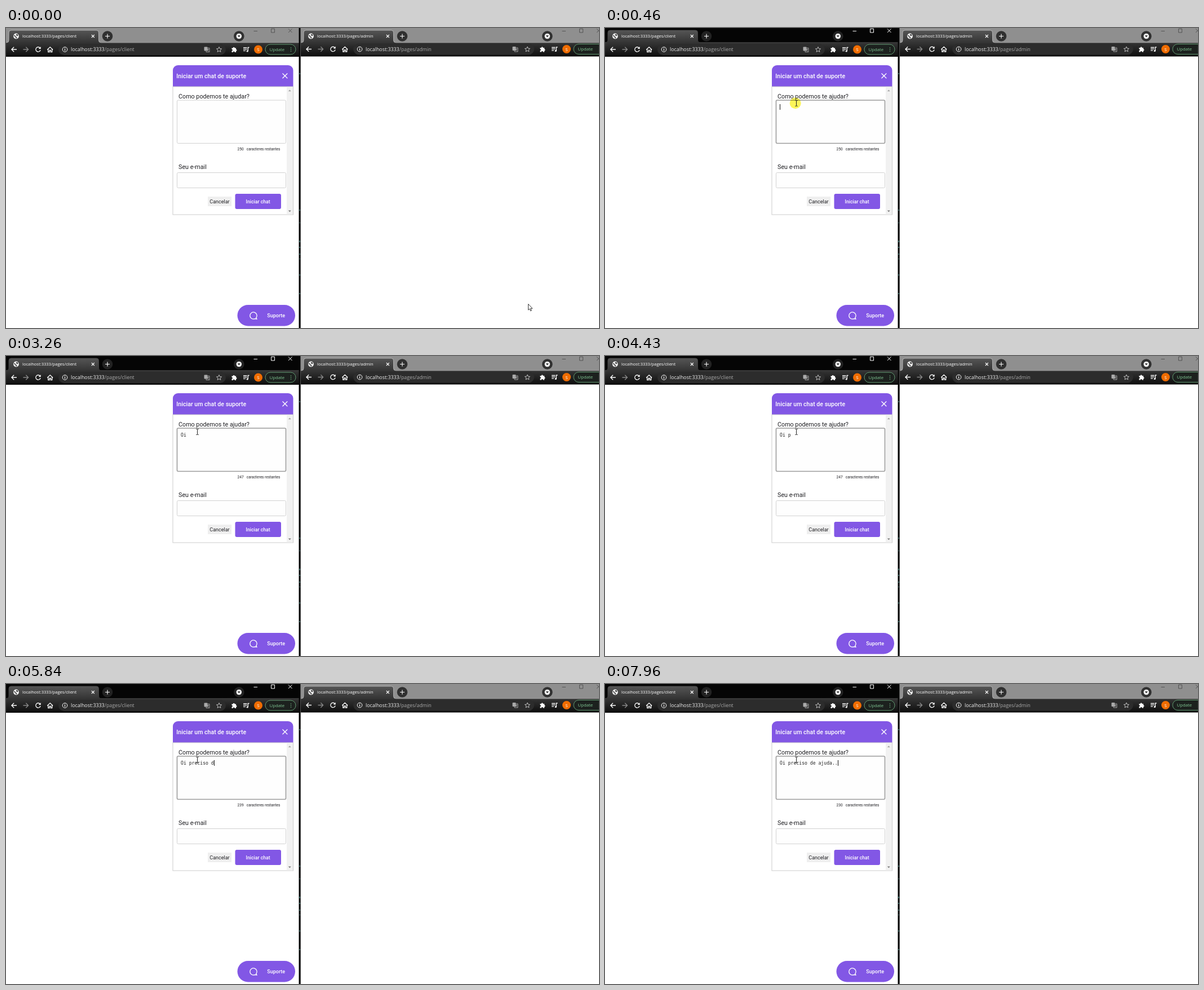
Recreate the animation shown at these times as an HTML page. Size 1052 by 532 pixels, loop 8 s.

```html
<!DOCTYPE html>
<html lang="pt">
<head>
<meta charset="utf-8">
<title>Chat de suporte</title>
<style>
  html, body { margin: 0; width: 100%; height: 100%; overflow: hidden; background: #fff; }
  svg { display: block; width: 1052px; height: 532px; }
  text { white-space: pre; }
  .win { --bar: #8f8f8f; --ctl: #555; --edge: #c4c4c4; --disc: #303030; }
  .win.active { --bar: #050505; --ctl: #fff; --edge: #4a4a4a; --disc: #222; }
  .ui { font-family: "Open Sans", "Noto Sans", sans-serif; }
  .page { font-family: Roboto, Arial, sans-serif; fill: #202024; }
  .mono { font-family: "DejaVu Sans Mono", "Noto Sans Mono", monospace; fill: #222; }
  .line { fill: none; stroke: #fff; stroke-width: 1.3; }
  .field { fill: #fefefe; stroke: #d2d2d2; }
  .focus { stroke: #9b9b9b; stroke-width: 1.6; }
</style>
</head>
<body>
<svg id="stage" viewBox="0 0 1052 532" xmlns="http://www.w3.org/2000/svg">
  <defs>
    <linearGradient id="tabFill" x1="0" y1="0" x2="0" y2="1">
      <stop offset="0" stop-color="#555"/><stop offset="1" stop-color="#343434"/>
    </linearGradient>
    <linearGradient id="toolFill" x1="0" y1="0" x2="0" y2="1">
      <stop offset="0" stop-color="#353535"/><stop offset="1" stop-color="#0d0d0d"/>
    </linearGradient>
  </defs>
  <rect width="1052" height="532" fill="#fff"/>
  <g id="windows"></g>
  <rect x="519.5" width="3.2" height="532" fill="#080808"/>
  <path d="M521 80v2M521 322v2M521 345v1M521 377v3M521 388v2M521 400v2M521 409v1M521 437v2M521 470v2" stroke="#3d7f78" stroke-width="1.4"/>

  <g class="page">
    <path d="M296 104V75a9 9 0 0 1 9-9h195.500a9 9 0 0 1 9 9v29z" fill="#8257e5"/>
    <text x="302.300" y="89" font-size="10.6" font-weight="500" fill="#fff">Iniciar um chat de suporte</text>
    <path d="M490.500 80.500l8.800 8.800M499.300 80.500l-8.800 8.800" class="line"/>
    <rect x="296" y="104" width="213.500" height="227" fill="#fff" stroke="#ccc"/>
    <rect x="498" y="104.500" width="11" height="226" fill="#f1f1f1"/>
    <path d="M500.800 112.300h5l-2.500-2.800z" fill="#a3a3a3"/>
    <path d="M500.800 323.400h5l-2.500 2.800z" fill="#777"/>
    <text x="306" y="125" font-size="10.75">Como podemos te ajudar?</text>
    <rect id="area" class="field" x="303.500" y="128" width="193" height="76.500" rx="2"/>
    <text id="left" x="410.500" y="217.300" font-size="6.6"></text>
    <text x="426.800" y="217.300" font-size="6.55">caracteres restantes</text>
    <text x="306" y="250" font-size="10.75">Seu e-mail</text>
    <rect class="field" x="303.500" y="256.500" width="193" height="27" rx="2"/>
    <rect x="358" y="299" width="42" height="17" fill="#efefef"/>
    <text x="361.300" y="311" font-size="9">Cancelar</text>
    <rect x="406.500" y="294" width="81.500" height="27" rx="3" fill="#8257e5"/>
    <text x="425.500" y="311" font-size="8.7" font-weight="500" fill="#fff">Iniciar chat</text>
    <rect x="410.500" y="491" width="102.500" height="37.500" rx="18.750" fill="#8257e5"/>
    <path d="M443.400 514.200a6.100 6.100 0 1 0-2.200 1.500l4 .5z" class="line" stroke-linejoin="round"/>
    <text x="463.300" y="513.400" font-size="9" font-weight="500" fill="#fff">Suporte</text>
  </g>
  <text id="typed" class="mono" x="310" y="143" font-size="8.14"></text>
  <rect id="caret" y="135" width="1" height="10" fill="#111"/>
  <circle id="halo" cx="337.700" cy="133.300" r="10" fill="#fdf65a" style="mix-blend-mode:multiply"/>
  <path id="arrow" d="M0 0v10.600l2.400-2.200 1.700 3.900 1.700-.8-1.700-3.700h3.300z" fill="#fff" stroke="#222" stroke-width=".9"/>
  <path id="beam" d="M-2.200-5h1.600l.6.500.6-.5h1.600M0-4.500v9M-2.200 5h1.600l.6-.5.6.5h1.600" fill="none" stroke="#222"/>
</svg>
<script>
const $ = id => document.getElementById(id);
const LOOP = 8000;
const MESSAGE = "Oi preciso de ajuda..";

// x: left edge, gap: extra shift of right-hand controls, width: visible width
function browser({ id, x, gap, width, page, dy }) {
  const r = n => n + gap;
  const address = `
    <path class="line" d="M19 38h-9m4.200-4.300l-4.300 4.300 4.300 4.300"/>
    <path class="line" style="stroke:#888" d="M30.500 38h9m-4.200-4.300l4.300 4.300-4.300 4.300"/>
    <path class="line" d="M60.300 35.300a4.200 4.200 0 1 0 .8 3.700"/><path d="M61.700 33v4h-4z" fill="#fff"/>
    <path class="line" d="M73.200 38.500l5-4.700 5 4.700M74.800 37.500v5h2.300v-3h2.300v3h2.300v-5"/>
    <rect x="93" y="28" width="${r(297)}" height="20" rx="10" fill="#2c2c2c"/>
    <circle cx="104.500" cy="38" r="4.300" class="line" style="stroke-width:1"/>
    <path d="M104.500 37.300v3M104.500 35.300v1" class="line"/>
    <text x="115" y="41.200" font-size="8.85" fill="#f1f1f1">localhost:3333<tspan fill="#a9a9a9">/pages/${page}</tspan></text>
    <g transform="translate(${gap} 0)">
      <rect x="351.500" y="33.500" width="6" height="7" rx="1" fill="#aaa"/>
      <path d="M357.500 35.500h3.500v7h-6v-2M356.500 38h4M358.500 37v1q-.5 2.200-2 3M357.300 39l2.500 2.300" class="line" style="stroke:#aaa;stroke-width:.9"/>
      <path d="M378 33.500l1.300 3.100 3.300.3-2.500 2.200.8 3.300-2.900-1.800-2.900 1.800.8-3.300-2.500-2.200 3.300-.3z" class="line" style="stroke:#ccc;stroke-width:.9"/>
      <path d="M400.500 35.500h2.300a1.400 1.400 0 1 1 2.800 0h2.500v2.500a1.400 1.400 0 1 1 0 2.800v2.200h-2.400a1.400 1.400 0 0 0-2.800 0h-2.400v-2.400a1.400 1.400 0 0 0 0-2.800z" fill="#fff"/>
      <path d="M421 35h6.500M421 37.700h6.500M421 40.400h4M429.300 41v-6.500h2.200" class="line"/>
      <circle cx="428.200" cy="41" r="1.600" fill="#fff"/>
      <circle cx="447.500" cy="38" r="7.500" fill="#ef6c00"/>
      <text x="447.500" y="41" font-size="8" fill="#fff" text-anchor="middle">S</text>
      <rect x="460" y="29" width="54" height="18" rx="9" fill="#1c211e" stroke="#629b72"/>
      <text x="467.500" y="40.800" font-size="7.8" fill="#81c995">Update</text>
      <path d="M505.500 34.500v1.200M505.500 37.500v1.200M505.500 40.500v1.200" stroke="#81c995" stroke-width="1.200"/>
    </g>`;
  return `<g id="${id}" class="win ui" transform="translate(${x} 0)">
    <rect width="${width}" height="27" fill="var(--bar)"/>
    <rect y="25.500" width="${width}" height="${25 + dy}" fill="url(#toolFill)"/>
    <path d="M1 26q4 0 4-4V8q0-4 4-4h151.500q4 0 4 4v14q0 4 4 4z" fill="url(#tabFill)"/>
    <path d="M0 25.800h1q4 0 4-4V8q0-4 4-4h151.500q4 0 4 4v13.800q0 4 4 4H${width}" fill="none" stroke="var(--edge)" stroke-width=".8"/>
    <path d="M5 26h159" stroke="#353535" stroke-width="1.500"/>
    <circle cx="18" cy="14.500" r="4.900" fill="#f1f1f1"/>
    <path d="M14.200 12.500q2 .3 3 2t2 1.800v2.500q-2 0-2.200-2t-2.900-2.500zM17.500 11h3l1.200 2.500-2.500.8z" fill="#444"/>
    <text x="29" y="17" font-size="7.55" fill="#fff">localhost:3333/pages/${page}</text>
    <path d="M151.800 12l5 5M156.800 12l-5 5" class="line" style="stroke-width:1.100"/>
    <circle cx="180" cy="14.500" r="9.300" fill="var(--disc)"/>
    <path d="M176 14.500h8M180 10.500v8" class="line" style="stroke-width:1.100"/>
    <g transform="translate(${gap} 0)">
      <circle cx="413.300" cy="14.500" r="9.300" fill="var(--disc)"/>
      <circle cx="413.300" cy="14.500" r="4.800" fill="#f1f1f1"/>
      <path d="M410.800 13.300h5l-2.500 2.900z" fill="#222"/>
      <path d="M439.500 5.500h6.500M470.500 1.500h6v6.500h-6zM501 1.500l6.500 6.500M507.500 1.500l-6.500 6.500" fill="none" stroke="var(--ctl)"/>
    </g>
    <g transform="translate(0 ${dy - .5})">${address}</g>
  </g>`;
}

$("windows").innerHTML =
  browser({ id: "client", x: 0, gap: 0, width: 520, page: "client", dy: .5 }) +
  browser({ id: "admin", x: 523, gap: 24, width: 529, page: "admin", dy: 0 });

// [time, x, y] of the pointer
const MOVES = [
  [0, 926, 489], [70, 898, 470], [150, 765, 388], [230, 570, 266],
  [310, 405, 168], [380, 339, 133], [690, 339, 134]
];
const BEAM_AT = 380, PRESS = 460, RELEASE = 540;

// [time, typed length, caret shown, characters left if it runs ahead]
const EDITS = [
  [0, 0, 0], [460, 0, 1], [1000, 0, 0], [1460, 0, 1], [1690, 1, 1],
  [2240, 1, 0], [2340, 2, 1], [2720, 3, 1], [3260, 3, 0, 247],
  [3730, 3, 1, 247], [3880, 4, 1], [4430, 4, 0], [4830, 5, 1],
  [4980, 6, 1], [5130, 7, 1], [5220, 8, 1], [5380, 9, 1], [5450, 10, 1],
  [5600, 11, 1], [5770, 12, 1], [5850, 13, 1], [5930, 14, 1],
  [6320, 15, 1], [6470, 16, 1], [6630, 17, 1], [6700, 18, 1],
  [6850, 19, 1], [7410, 19, 0], [7810, 20, 1], [7960, 21, 1]
];

const at = (steps, t) => steps.findLast(s => s[0] <= t);
const show = (id, on) => $(id).setAttribute("visibility", on ? "visible" : "hidden");

function draw(t) {
  const [, x, y] = at(MOVES, t);
  const [, length, caret, left = Math.min(250, 251 - length)] = at(EDITS, t);
  const focused = t >= PRESS;

  $("client").classList.toggle("active", focused);
  $("area").classList.toggle("focus", focused);
  $("typed").textContent = MESSAGE.slice(0, length);
  $("left").textContent = left;
  $("caret").setAttribute("x", Math.floor(310.2 + 4.9 * length));
  show("caret", caret);
  show("halo", focused && t < RELEASE);

  for (const id of ["arrow", "beam"]) {
    $(id).setAttribute("transform", `translate(${x + .5} ${y + .5})`);
    show(id, (id === "beam") === (t >= BEAM_AT));
  }
}

const start = performance.now();
function tick() {
  draw((performance.now() - start) % LOOP);
  requestAnimationFrame(tick);
}
tick();
</script>
</body>
</html>
```
